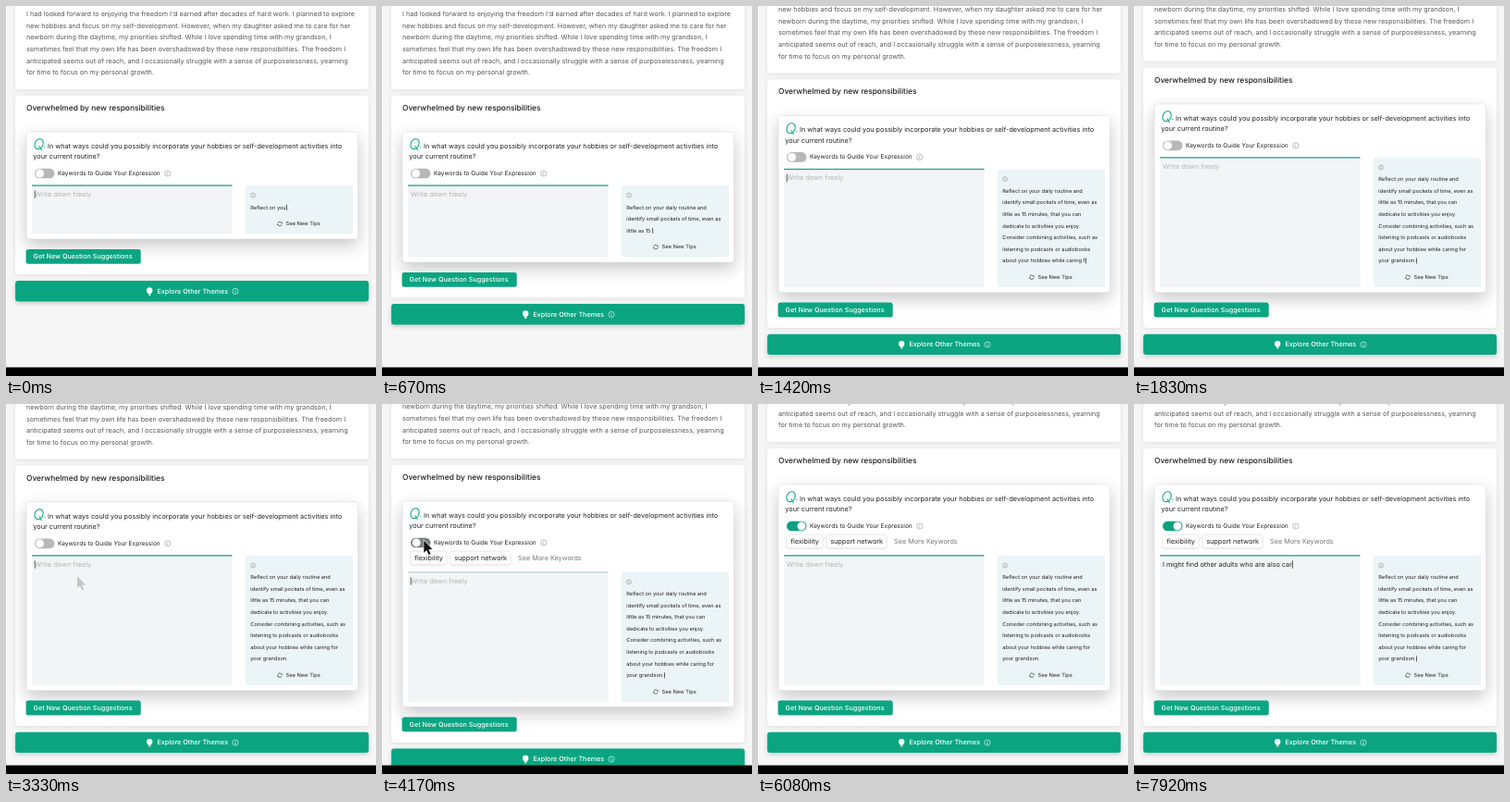
Animation, 400 px wide and 400 px high, one loop 8000 ms. Source, as an HTML page with a canvas:

```html
<!DOCTYPE html>
<html lang="en">
<head>
<meta charset="utf-8">
<title>Guided writing</title>
<style>
html, body { margin: 0; width: 100%; height: 100%; overflow: hidden; background: #f6f6f6; }
canvas { display: block; width: 400px; height: 400px; }
</style>
</head>
<body>
<canvas id="stage"></canvas>
<script>
const LOOP = 8000;
const GREEN = '#0ba582', INK = '#222', GREY = '#909090';
const LINE = 12.55;      // tip line height
const ROW = 18.8;        // keyword row height
const SLACK = 57.7;      // growth that fits before the page scrolls
const ROW_AT = 4110;

const story = [
  "I had looked forward to enjoying the freedom I'd earned after decades of hard work. I planned to explore",
  'new hobbies and focus on my self-development. However, when my daughter asked me to care for her',
  'newborn during the daytime, my priorities shifted. While I love spending time with my grandson, I',
  'sometimes feel that my own life has been overshadowed by these new responsibilities. The freedom I',
  'anticipated seems out of reach, and I occasionally struggle with a sense of purposelessness, yearning',
  'for time to focus on my personal growth.'
];
const tip = [
  'Reflect on your daily routine and ',
  'identify small pockets of time, even as ',
  'little as 15 minutes, that you can ',
  'dedicate to activities you enjoy. ',
  'Consider combining activities, such as ',
  'listening to podcasts or audiobooks ',
  'about your hobbies while caring for ',
  'your grandson.'
];
const answer = 'I might find other adults who are also car';
const tipKeys = [[0, 14], [830, 105], [1000, 140.5], [1420, 251.5], [1700, 268]];
const answerKeys = [[6380, 0], [6670, 6], [7500, 25], [7910, 42]];

const canvas = document.getElementById('stage');
const ctx = canvas.getContext('2d');
const ratio = window.devicePixelRatio || 1;
canvas.width = canvas.height = 400 * ratio;

const clamp = v => Math.max(0, Math.min(1, v));
const ramp = (t, a, b) => clamp((t - a) / (b - a));
const smooth = p => p * p * (3 - 2 * p);
const mix = (a, b, p) => a + (b - a) * p;

function along(keys, t) {
  if (t <= keys[0][0]) return keys[0][1];
  for (let i = 1; i < keys.length; i++) {
    const [a, from] = keys[i - 1], [b, to] = keys[i];
    if (t < b) return mix(from, to, ramp(t, a, b));
  }
  return keys[keys.length - 1][1];
}

// Time at which the tip reaches a given number of characters
const tipTime = n => along(tipKeys.map(([t, c]) => [c, t]), n);
const lineStarts = tip.map((_, i) => tip.slice(0, i).join('').length);

function scrollAt(t) {
  const limit = n => Math.max(0, n * LINE - SLACK);
  let y = 0;
  for (let i = 1; i < tip.length; i++) {
    const start = tipTime(lineStarts[i]);
    y += (limit(i) - limit(i - 1)) * smooth(ramp(t, start, start + 120));
  }
  return y + ROW * smooth(ramp(t, ROW_AT, 4560));
}

function text(str, x, y, size, color = INK, weight = 400) {
  ctx.font = `${weight} ${size}px Inter, sans-serif`;
  ctx.fillStyle = color;
  ctx.fillText(str, x, y);
  return x + ctx.measureText(str).width;
}

function box(x, y, w, h, r, fill, stroke) {
  ctx.beginPath();
  ctx.roundRect(x, y, w, h, r);
  if (fill) { ctx.fillStyle = fill; ctx.fill(); }
  if (stroke) { ctx.strokeStyle = stroke; ctx.lineWidth = 0.6; ctx.stroke(); }
}

function shadowed(color, blur, dy, draw) {
  ctx.save();
  ctx.shadowColor = color;
  ctx.shadowBlur = blur * ratio;
  ctx.shadowOffsetY = dy * ratio;
  draw();
  ctx.restore();
}

function caret(x, y, h, color = INK) {
  ctx.fillStyle = color;
  ctx.fillRect(x + 0.4, y - h / 2, 0.7, h);
}

function info(x, y, r, color) {
  ctx.strokeStyle = ctx.fillStyle = color;
  ctx.lineWidth = 0.6;
  ctx.beginPath();
  ctx.arc(x, y, r, 0, 7);
  ctx.stroke();
  ctx.fillRect(x - 0.35, y - r * 0.1, 0.7, r * 0.65);
  ctx.fillRect(x - 0.35, y - r * 0.55, 0.7, 0.7);
}

function refresh(x, y) {
  ctx.strokeStyle = ctx.fillStyle = '#333';
  ctx.lineWidth = 0.65;
  ctx.beginPath(); ctx.arc(x, y, 2.3, 0.3, 2.9); ctx.stroke();
  ctx.beginPath(); ctx.arc(x, y, 2.3, 3.4, 6); ctx.stroke();
  for (const s of [1, -1]) {
    ctx.beginPath();
    ctx.moveTo(x + 2.7 * s, y - 0.2 * s);
    ctx.lineTo(x + 1.2 * s, y - 0.5 * s);
    ctx.lineTo(x + 2.5 * s, y - 1.7 * s);
    ctx.fill();
  }
}

function bulb(x, y) {
  ctx.fillStyle = '#fff';
  ctx.beginPath(); ctx.arc(x, y - 1, 3.2, 0, 7); ctx.fill();
  ctx.fillRect(x - 1.5, y + 1, 3, 2.1);
  ctx.fillRect(x - 1.2, y + 3.5, 2.4, 0.9);
}

function toggle(t) {
  const p = smooth(ramp(t, 4130, 4400));
  const idle = mix(184, 125, ramp(t, 3950, 4100));   // darkens under the pointer
  const channel = end => Math.round(mix(idle, end, p));
  box(31, 175.7, 21.5, 10.6, 5.3, `rgb(${channel(11)},${channel(160)},${channel(126)})`);
  ctx.beginPath();
  ctx.arc(mix(36.6, 47, p), 181, 4.5, 0, 7);
  ctx.fillStyle = '#fff';
  ctx.fill();
}

function keywords(t) {
  ctx.globalAlpha = ramp(t, ROW_AT - 20, ROW_AT + 50);
  for (const [word, x, w] of [['flexibility', 31, 39], ['support network', 74, 65]]) {
    shadowed('rgba(0,0,0,.12)', 2, 0.7, () => box(x, 190.2, w, 14.6, 2.5, '#fff'));
    box(x, 190.2, w, 14.6, 2.5, null, '#dedede');
    text(word, x + 4.2, 197.4, 7.3);
  }
  text('See More Keywords', 147, 197.4, 7.25, '#777');
  ctx.globalAlpha = 1;
}

function tipBox(t, top, bottom, count) {
  box(259, top, 116, bottom - top, 2, '#ebf4f6');
  info(267, top + 10.7, 2.5, GREY);
  let end = 264.3, y = top + 23.8;
  tip.forEach((line, i) => {
    const shown = line.slice(0, Math.max(0, count - lineStarts[i]));
    if (!shown) return;
    y = top + 23.8 + i * LINE;
    end = text(shown, 264.3, y, 5.67);
  });
  const on = t < 2050 || (t > 3700 && (t + 100) % 700 < 350);
  if (on) caret(end, y, 6);
  refresh(296, bottom - 10.8);
  text('See New Tips', 302.5, bottom - 10.8, 5.72);
}

function answerBox(t, top, bottom) {
  box(28, top, 216.5, bottom - top, 1, '#f3f4f6');
  ctx.globalAlpha = t < ROW_AT ? 1 : mix(0.2, 1, ramp(t, ROW_AT, 4560));
  ctx.fillStyle = '#22a087';
  ctx.fillRect(28, top - 0.6, 216.5, 1.3);
  ctx.globalAlpha = 1;
  const typed = answer.slice(0, Math.floor(along(answerKeys, t)));
  let end = 31;
  if (typed) end = text(typed, 31, top + 9.7, 7.25);
  else text('Write down freely', 31, top + 9.7, 7.35, '#b4b4b4');
  const on = t < 2120 ? Math.floor(t / 530) % 2 === 0 : t < 4250 || t > 6150;
  if (on) caret(typed ? end : 30.4, top + 9.7, 8.5);
}

function pointer(t) {
  const alpha = mix(0.2, 1, ramp(t, 3330, 3600)) * (1 - ramp(t, 5250, 5600));
  if (t < 3320 || alpha <= 0) return;
  const p = smooth(ramp(t, 3420, 4050));
  ctx.save();
  ctx.globalAlpha = alpha;
  ctx.translate(mix(77, 45.3, p), mix(186, 147.5, p));
  ctx.beginPath();
  for (const [x, y] of [[0, 0], [0, 13.2], [3, 10.5], [5.1, 15.5], [7.2, 14.6], [5.1, 9.8], [9.2, 9.6]]) ctx.lineTo(x, y);
  ctx.closePath();
  ctx.lineWidth = 1.2;
  ctx.strokeStyle = '#fff';
  ctx.stroke();
  ctx.fillStyle = '#111';
  ctx.fill();
  ctx.restore();
}

function draw(t) {
  const count = Math.floor(along(tipKeys, t));
  const lines = lineStarts.filter(s => s < count).length;
  const row = t >= ROW_AT ? ROW : 0;
  const grow = (lines - 1) * LINE + row;
  const top = 194 + row, bottom = 246.3 + grow;

  ctx.setTransform(ratio, 0, 0, ratio, 0, 0);
  ctx.textBaseline = 'middle';
  ctx.textRendering = 'geometricPrecision';
  ctx.fillStyle = '#f6f6f6';
  ctx.fillRect(0, 0, 400, 400);

  ctx.save();
  ctx.translate(0, -scrollAt(t));

  shadowed('rgba(0,0,0,.10)', 5, 1, () => {
    box(10, -60, 382, 150, 4, '#fff');
    box(10, 97, 382, 193.3 + grow, 4, '#fff');
  });
  story.forEach((line, i) => text(line, 22, 9 + i * 12.6, 7.21, '#555'));
  text('Overwhelmed by new responsibilities', 22, 110.4, 8.4, '#1c1c1c', 500);

  shadowed('rgba(0,0,0,.22)', 18, 7, () => box(22, 136, 358.5, 116 + grow, 3, '#fff'));
  box(22, 136, 358.5, 116 + grow, 3, null, '#dcdcdc');
  text('Q', 29.3, 150.3, 16, GREEN, 'italic 300');
  text('.', 40.6, 150.6, 9, GREEN, 500);
  text('In what ways could you possibly incorporate your hobbies or self-development activities into', 45, 151.7, 7.27);
  text('your current routine?', 29.3, 163, 7.3);

  toggle(t);
  text('Keywords to Guide Your Expression', 56, 181, 6.58);
  info(174.8, 181, 3.1, GREY);
  if (row) keywords(t);
  answerBox(t, top, bottom);
  tipBox(t, top, bottom, count);

  box(21.6, 262.9 + grow, 124.1, 15.8, 2.5, GREEN);
  text('Get New Question Suggestions', 29.6, 270.8 + grow, 7.2, '#fff', 500);

  shadowed('rgba(0,0,0,.18)', 5, 2, () => box(10.1, 297 + grow, 382, 22.4, 3, GREEN));
  bulb(155.2, 308.4 + grow);
  text('Explore Other Themes', 163.5, 308.4 + grow, 7.2, '#fff', 500);
  info(248, 308.4 + grow, 3.1, '#fff');
  ctx.restore();

  pointer(t);
  ctx.fillStyle = '#000';
  ctx.fillRect(0, 390.6, 400, 9.4);
}

let start;
function tick(now) {
  start ??= now;
  draw((now - start) % LOOP);
  requestAnimationFrame(tick);
}
requestAnimationFrame(tick);
</script>
</body>
</html>
```
